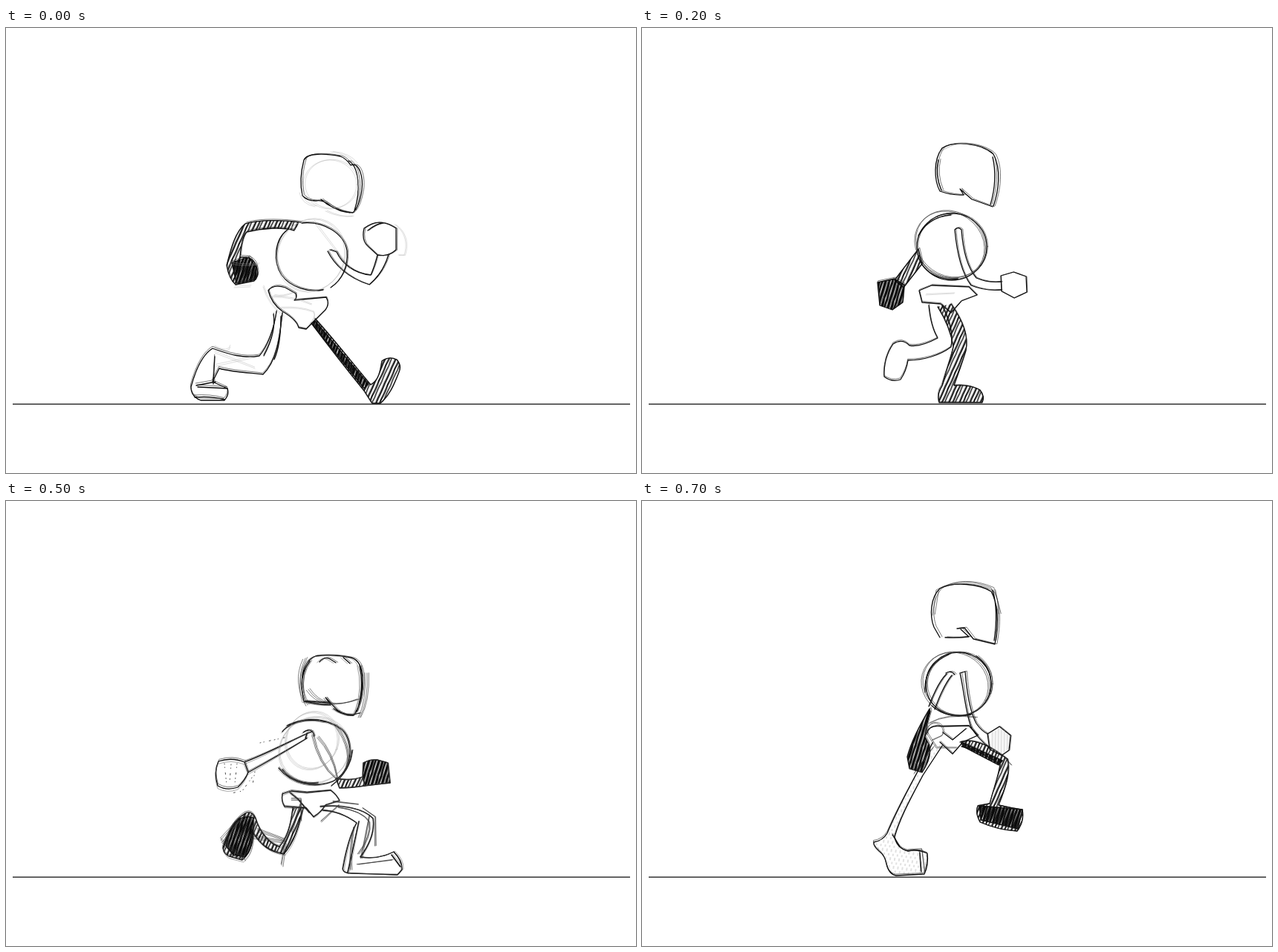
An HTML page without scripts that plays this animation: 848 px wide and 600 px high, repeating every 0.8 s.

```html
<!DOCTYPE html>
<html lang="en">
<head>
<meta charset="utf-8">
<title>Run cycle</title>
<style>
html, body { margin: 0; height: 100%; overflow: hidden; background: #fff; }
svg { display: block; width: 848px; height: 600px; }
.pose {
  visibility: hidden; fill: none; stroke: #0a0a0a; stroke-width: 1.3;
  stroke-linecap: round; stroke-linejoin: round;
  animation: show .8s step-end infinite;
  animation-delay: calc((var(--i) - 8) * .1s);
}
@keyframes show { 0% { visibility: visible } 12.5%, 100% { visibility: hidden } }
.echo { fill-opacity: 0; stroke: #222; stroke-width: .6; transform-origin: 420px 340px; transform: rotate(.7deg) translate(1px, -1px); }
.turn { stroke: #555; stroke-width: .5; transform: rotate(-1.1deg) translate(-1px, 1px); }
.far { fill: url(#hatch); }
.dense { fill: url(#dense); }
.pale { fill: url(#pale); }
.thin { stroke: #333; stroke-width: .6; }
.faint { stroke: #aaa; stroke-width: .4; }
.dots { stroke: #222; stroke-width: .8; stroke-dasharray: 1 4 .5 7 2 5; }
</style>
</head>
<body>
<svg viewBox="0 0 848 600">
<defs>
  <pattern id="hatch" width="13" height="23" patternUnits="userSpaceOnUse" patternTransform="rotate(24)">
    <g fill="none" stroke="#0a0a0a">
      <path d="M2 0Q3 12 2 23" stroke-width="2"/>
      <path d="M6 0Q5 12 6 23" stroke-width="1.4"/>
      <path d="M10.5 0Q11 12 10.5 23" stroke-width="2.2"/>
    </g>
  </pattern>
  <pattern id="dense" width="13" height="23" patternUnits="userSpaceOnUse" patternTransform="rotate(17)">
    <g fill="none" stroke="#0a0a0a">
      <path d="M2 0Q3 12 2 23" stroke-width="3.4"/>
      <path d="M6.5 0Q5.5 12 6.5 23" stroke-width="3"/>
      <path d="M10.5 0Q11 12 10.5 23" stroke-width="3.8"/>
    </g>
  </pattern>
  <pattern id="pale" width="6" height="11" patternUnits="userSpaceOnUse" patternTransform="rotate(8)">
    <path d="M2 0V4M5 6V9" stroke="#888" stroke-width=".5"/>
  </pattern>

  <!-- contact -->
  <path id="a-arm-back" d="M397 262C375 259 340 258 322 264C308 275 302 300 297 320C299 332 302 340 309 346L334 341Q341 335 338 325C336 314 330 308 315 309C316 295 318 282 324 275C345 270 370 268 388 273"/>
  <path id="a-leg-back" d="M364 382C361 405 352 430 341 442C320 446 300 440 278 432C265 440 256 458 249 484Q249 497 262 502L294 502Q301 494 298 486L278 477Q283 467 287 459C305 464 330 465 346 467C364 450 368 420 372 384"/>
  <path id="a-leg-front" d="M416 392C440 418 465 450 491 481C502 475 504 462 506 449Q515 442 526 447Q533 455 529 464C522 482 516 496 504 506L493 506L482 489C460 462 435 430 411 398"/>
  <g id="a-body">
    <path d="M379 272C361 285 359 315 371 333C383 350 408 357 427 353M398 263C428 260 455 277 459 300C461 322 452 340 437 350"/>
    <path d="M353 354Q360 345 376 350L390 358Q392 365 388 367L431 363Q436 372 430 380Q416 394 404 406L394 404Q391 393 372 382Q357 371 353 354"/>
    <path class="faint" d="M358 363Q385 362 411 373M370 378Q395 376 414 383Q418 391 408 400M346 349Q352 372 374 390M387 357Q372 364 361 361"/>
    <ellipse class="faint" cx="436" cy="211" rx="36" ry="33"/>
    <ellipse class="faint" cx="410" cy="307" rx="45" ry="50" transform="rotate(25 410 307)"/>
    <path class="faint" d="M437 167Q460 169 470 182M395 222Q398 238 416 241M430 247Q449 256 466 254M413 260L463 325M302 318Q320 322 340 319M281 431Q300 441 302 430M281 438L335 459M283 456L340 443M523 265C537 274 541 290 536 306L528 306M307 350L329 349"/>
  </g>

  <g id="p0">
    <use href="#a-arm-back" class="far"/>
    <path class="dense" d="M304 316L327 309L337 323L336 339L310 344Z"/>
    <use href="#a-leg-front" class="far"/>
    <path class="dense" d="M416 395L488 480L482 486L412 399Z"/>
    <use href="#a-body"/>
    <use href="#a-leg-back"/>
    <path d="M401 178C405 168 430 169 450 173Q458 176 464 185C476 180 481 202 479 218Q476 240 467 249C452 249 446 245 437 240Q427 231 417 233Q405 233 399 226C395 208 397 193 401 178M461 179C475 186 478 219 469 246M424 231Q439 245 463 249"/>
    <path d="M433 301C442 319 460 337 489 346C501 336 510 323 515 305M436 299L445 302C452 317 468 331 491 333Q496 322 500 306M500 306L488 295Q478 287 482 270C496 260 508 259 525 270L525 299Q514 309 500 306M487 273Q498 264 507 263M360 386Q364 410 347 442M370 389Q370 427 361 447M281 443L279 480M258 484L298 486M254 498Q276 496 294 501M282 477L256 482"/>
  </g>

  <g id="p4">
    <use href="#a-leg-back" class="far"/>
    <path class="far" d="M453 326Q464 346 483 355C500 345 513 319 523 292L507 300C502 321 493 335 482 342L460 328"/>
    <path class="far" d="M487 270L504 262L522 278L521 292L499 302L482 292Z"/>
    <use href="#a-body"/>
    <use href="#a-arm-back"/>
    <use href="#a-leg-front"/>
    <path d="M403 176C410 168 440 170 460 174C478 182 483 205 480 225Q477 248 471 262M403 176C394 190 392 211 399 229Q412 239 429 241L424 233L436 240L447 251L468 259M388 263Q400 270 399 282L389 275M397 274L400 285M404 287V288M416 401L487 486M429 408L481 467M372 386Q377 400 398 402L411 379"/>
    <path class="faint" d="M497 488A8 8 0 1 0 513 484A7 7 0 1 0 503 490M427 298H441L462 324M306 316Q328 304 335 324"/>
  </g>

  <!-- down -->
  <path id="b-leg-back" d="M386 414C383 440 378 455 368 466C355 462 342 448 336 428Q331 417 322 421C310 428 297 448 292 468Q293 478 304 480L318 484Q328 476 330 464L333 448C343 464 355 473 374 476C388 460 394 440 400 414"/>
  <g id="b-body">
    <path d="M372 395L384 391L405 393L437 390Q445 396 449 404L430 410Q424 420 414 426L404 414L375 412Q370 405 372 395M382 393L393 402L408 420"/>
    <ellipse class="faint" cx="415" cy="336" rx="48" ry="44" transform="rotate(-25 415 336)"/>
    <ellipse class="faint" cx="412" cy="323" rx="35" ry="39" transform="rotate(20 412 323)"/>
    <path class="thin" d="M403 212Q388 242 406 275M407 254Q427 285 475 267M486 232Q488 270 476 292M384 402H397V430M305 448L376 460L371 491M338 443L376 457M397 406L384 446M424 432L448 410M440 405L474 409M313 430L289 457L321 482"/>
  </g>

  <g id="p1">
    <path class="dense" d="M367 333L314 357L320 367L339 361L368 344Z"/>
    <path class="dense" d="M283 350L313 349L320 358L318 386L310 394L290 388L281 380Z"/>
    <path class="dense" d="M285 352L316 354L317 382L308 391L286 382Z"/>
    <path class="far" d="M432 412C455 408 480 412 495 430C496 450 490 468 484 478Q490 486 500 484Q512 474 525 476Q535 488 531 501L512 503L466 502Q464 494 470 488C474 470 478 450 481 436C465 428 450 422 436 419"/>
    <use href="#b-body"/>
    <use href="#b-leg-back"/>
    <ellipse cx="415" cy="341" rx="47" ry="45"/>
    <path d="M371 323Q383 301 410 298M378 369Q394 383 418 383M457 319Q468 346 442 374"/>
    <path d="M412 211C430 205 457 208 478 221C488 242 486 264 475 289M412 211C401 225 399 250 404 268Q417 272 429 268L440 277L453 286L474 290M405 245L409 270L430 274M437 209Q464 211 478 234M475 224L480 246L475 285M426 266L446 286"/>
    <path d="M421 320Q425 311 431 319M423 318C426 345 430 365 438 382Q462 387 490 384M428 318C430 345 436 360 442 372Q460 377 482 374M481 358L496 355L519 357L519 384L500 390L482 381ZM483 359L485 380M515 360L517 382M329 441Q347 468 374 475"/>
  </g>

  <g id="p5">
    <use href="#b-leg-back" class="far"/>
    <path class="dense" d="M333 427Q305 418 296 465L306 477L321 480Q332 470 333 447Z"/>
    <path class="far" d="M444 374Q463 378 480 372L483 384Q465 387 449 387Z"/>
    <path class="dense" d="M480 372L481 353Q490 348 500 349L514 353L517 380L483 384Z"/>
    <use href="#b-body"/>
    <path d="M372 311C385 294 425 288 452 308C470 325 466 365 440 378C415 388 385 382 367 360M378 303Q405 290 430 298M372 362Q390 384 420 380M466 336Q464 364 438 384"/>
    <path d="M417 209C400 215 394 240 401 270Q420 275 437 275L430 265L446 282Q458 291 468 289Q479 273 480 248C481 226 476 214 464 211Q440 206 417 209M409 216Q395 234 399 260M422 217Q428 209 436 213L444 218M454 211L463 219M476 222Q483 252 472 284M441 280Q456 292 476 286M403 270L435 272"/>
    <path d="M400 312Q412 304 415 317M412 311C399 315 350 342 321 352Q304 345 286 351Q279 366 285 384Q297 391 312 386Q321 378 326 366Q362 346 405 320M321 352L326 366M405 313L403 321"/>
    <path class="thin" d="M413 315Q421 355 444 374M420 318Q440 340 446 373M444 302Q470 340 455 365"/>
    <path d="M423 412C450 409 481 414 494 428C497 448 486 468 477 480Q500 484 522 473Q534 485 533 497L527 504L465 502Q451 502 454 493C458 470 464 448 472 434Q450 418 426 417M475 432L460 502M519 477L531 493"/>
    <path class="thin" d="M447 413Q480 418 489 433Q492 452 474 476M468 440Q462 474 464 497M489 424L478 482M480 414L497 426L497 465M473 490L520 484"/>
  </g>

  <!-- passing -->
  <path id="c-stand" d="M416 372C432 395 440 415 436 435C430 455 424 470 420 482Q440 480 455 488Q462 497 458 505L400 505Q397 492 404 482C410 460 416 445 419 430C416 410 408 392 398 376"/>
  <path id="c-swing" d="M386 374C388 395 392 408 398 418C385 425 370 430 360 428Q350 418 338 426Q325 445 326 470Q336 478 348 474Q356 462 358 448C378 448 400 442 416 430C420 410 412 390 404 374"/>
  <path id="c-hand-back" d="M317 343L340 338L353 346L351 370L337 380L320 374Z"/>
  <path id="c-hand-front" d="M483 334L500 329L517 335L518 356L501 364L484 355Z"/>
  <g id="c-body">
    <ellipse cx="417" cy="295" rx="47" ry="45"/>
    <path d="M372 280Q385 255 416 252M376 318Q392 341 425 338"/>
    <path d="M404 162C418 152 456 154 473 170C484 190 480 220 473 240M404 162C392 178 393 205 401 220Q418 226 433 225L428 217L444 231L472 241M399 178Q394 198 403 219M472 174Q479 204 469 238"/>
    <path d="M373 354L390 347L440 349L451 360L430 368L416 384L402 372L377 370Z"/>
    <ellipse class="thin" cx="414" cy="292" rx="49" ry="43" transform="rotate(35 414 292)"/>
    <path class="faint" d="M399 168Q430 145 470 166M382 360L420 358"/>
  </g>
  <g id="p2">
    <use href="#c-stand" class="far"/>
    <path class="far" d="M372 298L340 340L352 350L377 318Z"/>
    <use href="#c-hand-back" class="dense"/>
    <use href="#c-body"/>
    <use href="#c-swing"/>
    <use href="#c-hand-front"/>
    <path d="M421 272Q425 267 430 272C432 300 438 323 450 337Q466 344 484 342M421 272C424 305 430 330 443 347Q462 355 484 353"/>
  </g>
  <g id="p6">
    <use href="#c-swing" class="far"/>
    <path class="far" d="M450 330Q466 341 484 340V355Q459 353 443 336Z"/>
    <use href="#c-hand-front" class="dense"/>
    <use href="#c-body"/>
    <use href="#c-stand"/>
    <use href="#c-hand-back"/>
    <path d="M403 272Q412 266 416 275M405 271C385 295 362 318 341 338M414 275C395 305 375 328 353 349"/>
  </g>

  <!-- up -->
  <path id="d-stand" d="M391 326C375 360 350 400 330 448Q324 458 312 460Q311 465 319 472Q327 478 329 489Q332 503 342 505L380 503Q386 490 384 475Q370 469 358 472Q343 468 340 453C348 425 365 395 378 370L404 330"/>
  <path id="d-swing" d="M428 325C450 318 475 335 492 348C496 365 490 385 480 410Q497 414 512 416Q515 432 505 445Q480 444 455 433Q448 420 452 411L468 408C474 385 480 370 482 355C465 345 450 335 430 331"/>
  <g id="d-body">
    <ellipse cx="426" cy="247" rx="44" ry="43"/>
    <path d="M381 258Q379 221 413 207M390 276Q410 294 443 288M450 209Q476 228 468 260"/>
    <path d="M383 314Q386 301 404 304L440 303L452 316L432 325L418 341L401 325M405 312L418 322L436 307"/>
    <ellipse class="thin" cx="421" cy="247" rx="46" ry="42" transform="rotate(28 421 247)"/>
    <path class="thin" d="M384 315A11 11 0 1 1 403 317L390 323M386 300Q410 286 450 292M381 310L396 333H423M366 368L392 332M358 472L377 470L381 500M487 345L497 356M391 154L396 120Q430 100 470 117L480 152"/>
  </g>
  <g id="p3">
    <use href="#d-stand" class="far"/>
    <path class="dense" d="M378 365L384 371Q356 405 342 449L334 447Q350 400 378 365M318 462Q334 458 340 455Q346 469 358 474L382 478V499L340 502Q336 478 318 462"/>
    <path class="far" d="M440 291H449Q452 307 462 315L456 324Q444 311 440 291"/>
    <path class="dense" d="M468 317L479 306L497 310Q503 322 498 338L488 343L462 327Z"/>
    <use href="#d-body"/>
    <use href="#d-swing"/>
    <path d="M396 125Q410 112 436 109Q449 112 456 121L462 115Q474 122 474 143Q478 166 474 190Q456 187 440 179L432 173L441 185M396 125C386 143 393 165 402 178M394 130Q389 149 398 171M405 180Q409 187 420 184L440 181L473 186M472 128Q480 148 474 182"/>
    <path d="M403 241Q407 228 418 236L410 233M403 240C385 265 368 297 362 325L356 358L391 362Q397 348 392 335Q384 326 370 328M416 236C401 260 387 293 380 325M381 275Q365 310 360 331M464 355L473 366L464 396M360 353L388 357M369 335L366 353M385 258L416 294"/>
    <path class="thin" d="M410 240Q380 285 370 327M488 354L473 406M476 340Q486 355 470 402M440 323L485 342M455 418L508 425L506 440M365 340Q380 320 395 345"/>
  </g>
  <g id="p7">
    <use href="#d-swing" class="far"/>
    <path class="dense" d="M454 411L512 416L506 442L456 430ZM430 325L485 350L480 356L432 331Z"/>
    <path class="dense" d="M387 280C375 300 362 325 357 345L360 361L377 366Q391 345 386 328L381 318Q383 300 388 284Z"/>
    <use href="#d-body"/>
    <use href="#d-stand" class="pale"/>
    <path d="M401 118C388 130 387 155 393 170L401 184M401 118C420 108 455 112 470 122C480 140 480 165 475 193L446 186L434 171L424 172M408 184Q425 185 440 183L429 173M472 120Q480 148 474 188"/>
    <path d="M409 232Q416 228 421 234M410 233Q398 245 386 277M417 235Q405 250 394 281M428 232L435 230C437 255 442 285 450 300Q457 310 465 314M428 232C434 258 436 290 444 307Q453 321 468 333M337 450L347 466M374 474L376 500"/>
    <path d="M465 314L481 304L496 316L494 336L484 343L468 335Z"/>
    <path class="faint" d="M471 311V336M475 310V338M479 307V339M483 307V341M487 309V340M491 314V336"/>
  </g>
</defs>

<path d="M9 507.2H840" stroke="#0a0a0a" stroke-width="1.2"/>
<g class="pose" style="--i:0"><use href="#p0"/><use href="#p0" class="echo"/></g>
<g class="pose" style="--i:1"><use href="#p1"/><use href="#p1" class="echo"/><use href="#p1" class="echo turn"/></g>
<g class="pose" style="--i:2"><use href="#p2"/><use href="#p2" class="echo"/></g>
<g class="pose" style="--i:3"><use href="#p3"/><use href="#p3" class="echo"/><use href="#p3" class="echo turn"/></g>
<g class="pose" style="--i:4"><use href="#p4"/><use href="#p4" class="echo"/></g>
<g class="pose" style="--i:5">
  <use href="#p5"/><use href="#p5" class="echo"/><use href="#p5" class="echo turn"/>
  <path class="dots" d="M294 354L297 383M303 355L301 379M311 354L308 381M331 373L318 391L303 394M335 365L332 382M342 326L375 319"/>
</g>
<g class="pose" style="--i:6"><use href="#p6"/><use href="#p6" class="echo"/></g>
<g class="pose" style="--i:7"><use href="#p7"/><use href="#p7" class="echo"/></g>
</svg>
</body>
</html>
```
